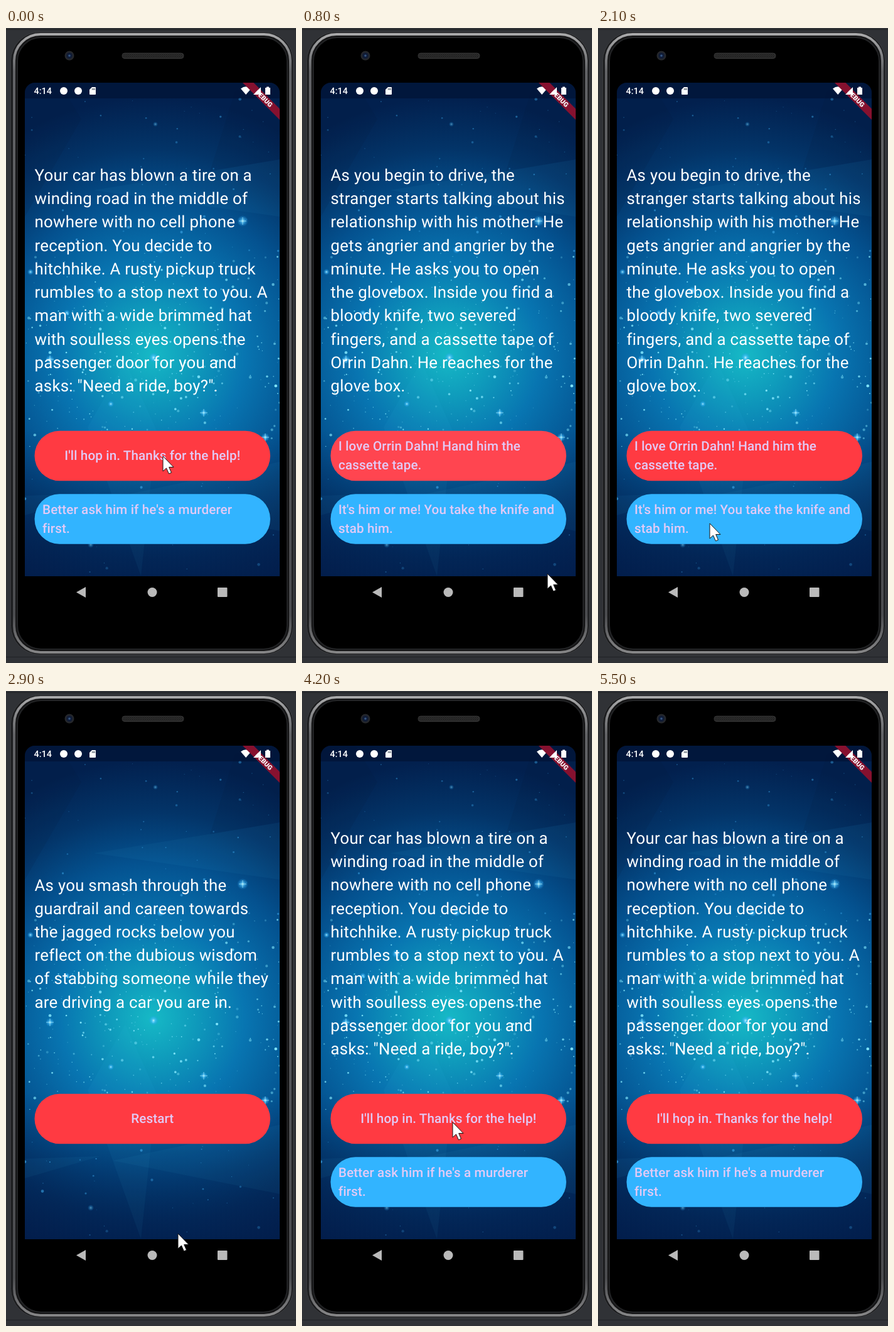
Animation, 462 px wide and 1010 px high, one loop 5.6 s. Source, as an HTML page:

```html
<!DOCTYPE html>
<html lang="en">
<head>
<meta charset="utf-8">
<title>Choose your story</title>
<style>
  html, body { margin: 0; height: 100%; overflow: hidden; background: #303236; }
  svg { display: block; width: 100vw; height: 100vh; }
  text { font-family: Roboto, sans-serif; white-space: pre; text-rendering: geometricPrecision; }
  .story { font-size: 25.85px; letter-spacing: .26px; fill: #fff; }
  .label { font-size: 20.68px; font-weight: 500; letter-spacing: .1px; fill: #e2caf6; }
</style>
</head>
<body>
<svg viewBox="0 0 462 1010">
  <defs>
    <radialGradient id="glow" gradientUnits="userSpaceOnUse" cx="233" cy="520" r="410">
      <stop offset="0" stop-color="#16b9c6"/>
      <stop offset=".16" stop-color="#0f9cbc"/>
      <stop offset=".36" stop-color="#0875b1"/>
      <stop offset=".6" stop-color="#045290"/>
      <stop offset=".8" stop-color="#033468"/>
      <stop offset="1" stop-color="#02204e"/>
    </radialGradient>
    <linearGradient id="shade" x2="0" y2="1">
      <stop offset="0" stop-color="#021c4a" stop-opacity="0"/>
      <stop offset=".5" stop-color="#021c4a" stop-opacity=".35"/>
      <stop offset="1" stop-color="#021c4a" stop-opacity=".7"/>
    </linearGradient>
    <radialGradient id="halo">
      <stop offset="0" stop-color="#d8fbff"/>
      <stop offset=".3" stop-color="#58c8ff" stop-opacity=".8"/>
      <stop offset="1" stop-color="#1998ee" stop-opacity="0"/>
    </radialGradient>
    <linearGradient id="metal" x2="0" y2="1">
      <stop offset="0" stop-color="#a9a9aa"/>
      <stop offset=".06" stop-color="#626366"/>
      <stop offset=".94" stop-color="#4b4c4f"/>
      <stop offset="1" stop-color="#858586"/>
    </linearGradient>
    <pattern id="mesh" width="3" height="3" patternUnits="userSpaceOnUse">
      <path d="M0 0h3v3h-3z" fill="#2d2d2d"/><path d="M0 0h1v1h-1zM1.5 1.5h1v1h-1z" fill="#111"/>
    </pattern>
    <clipPath id="screen"><path d="M30 872V103a16 16 0 0 1 16-16H420a16 16 0 0 1 16 16V872z"/></clipPath>
  </defs>

  <path d="M0 2.5H462M0 1000.5H462" stroke="#1f2124"/>

  <!-- phone body -->
  <rect x="7.500" y="6.500" width="450" height="990" rx="46" fill="#1c1d1f" stroke="#3b3c3f"/>
  <rect x="13" y="10" width="440" height="983" rx="42" fill="#151516" stroke="url(#metal)" stroke-width="4"/>
  <rect x="18" y="15" width="430" height="973" rx="38" fill="#000" stroke="#222325" stroke-width="2"/>
  <rect x="185" y="40" width="98" height="8.500" rx="4" fill="url(#mesh)" stroke="#363636"/>
  <circle cx="101" cy="44" r="7.500" fill="#25272b"/>
  <circle cx="101" cy="44" r="4.800" fill="#101c36"/>
  <circle cx="101" cy="44" r="1.800" fill="#365582"/>

  <!-- wallpaper -->
  <g clip-path="url(#screen)">
    <path d="M30 87H436V872H30z" fill="url(#glow)"/>
    <path d="M30 640H436V872H30z" fill="url(#shade)"/>
    <g fill="#38b8e8" fill-opacity=".05">
      <path d="M140 258L436 209V300zM170 747L436 690V800zM30 744L150 740 30 775z"/>
      <path d="M190 530L130 635 215 872 240 640z"/>
    </g>
    <path d="M30 87H85L120 145 30 300zM365 100L436 87V209L325 228z" fill="#001538" fill-opacity=".1"/>
    <g id="stars"></g>
    <path d="M30 87H436V112H30z" fill="#000b25" fill-opacity=".42"/>
  </g>

  <!-- status bar -->
  <g fill="#fff">
    <text x="44.5" y="105" font-size="14.4" font-weight="500">4:14</text>
    <circle cx="92" cy="100" r="6"/>
    <circle cx="115" cy="100" r="6"/>
    <path d="M137 94H142a1 1 0 0 1 1 1V105a1 1 0 0 1-1 1H134a1 1 0 0 1-1-1V98z"/>
    <path d="M137.5 96v2.5M139.5 96v2.5M141.2 96v2.5" stroke="#123" stroke-width=".9"/>
    <path d="M374 96.500Q382 90 390.500 96.500L382.200 106z"/>
  </g>
  <g clip-path="url(#screen)">
    <path d="M377 87H394.500L436 128.500V146z" fill="#86112f"/>
    <path d="M394 106L406 94V106zM413 95H415V93.500H419V95H421V106H413z" fill="#fff"/>
    <text transform="translate(411 112) rotate(45)" y="3.7" font-size="10.5" font-weight="900" text-anchor="middle" fill="#fff">DEBUG</text>
  </g>

  <g id="scenes"></g>

  <g fill="#bababa">
    <path d="M112 897.500L127 889V906z"/>
    <circle cx="233" cy="897.500" r="7.500"/>
    <rect x="337" y="890" width="15.500" height="15" rx="1"/>
  </g>
  <path id="cursor" d="M0 0V24L5.500 19 9.500 28 13.500 26.200 9.700 17.500H17z" fill="#fff" stroke="#151515"/>
</svg>
<script>
const LOOP = 5600, STEP = 100;
const RED = '#ff3a42', RED_PRESSED = '#ff4550', BLUE = '#32b4ff';
const $ = id => document.getElementById(id);

function add(parent, tag, attrs, content = '') {
  const node = document.createElementNS('http://www.w3.org/2000/svg', tag);
  for (const name in attrs) node.setAttribute(name, attrs[name]);
  node.textContent = content;
  return parent.appendChild(node);
}

function drawStars() {
  let seed = 41;
  const random = () => (seed = seed * 16807 % 2147483647) / 2147483647;
  const stars = $('stars');
  for (let i = 0; i < 420; i++) {
    const cx = 30 + 406 * random();
    const spread = (random() + random() + random()) / 3;
    const cy = i % 3 ? 250 + 560 * spread : 112 + 755 * random();
    const near = Math.max(0, 1 - Math.abs(cy - 530) / 350);
    add(stars, 'circle', {
      cx, cy, r: .6 + 1.8 * random() ** 3,
      fill: near > .5 ? '#7fe4fa' : '#3aa4e6',
      opacity: .25 + .6 * random() * (.4 + near)
    });
  }
  const bright = [[377, 307, 9], [70, 527, 7], [315, 612, 6], [413, 651, 7], [235, 524, 8],
    [150, 418, 7], [246, 353, 6], [39, 388, 5], [167, 598, 5], [135, 822, 5], [97, 453, 5], [238, 153, 4]];
  for (const [cx, cy, r] of bright) add(stars, 'circle', {cx, cy, r, fill: 'url(#halo)', opacity: cy < 200 || cy > 800 ? .5 : .9});
  for (const [x, y] of bright.slice(0, 4)) {
    add(stars, 'path', {d: `M${x - 6} ${y}h12M${x} ${y - 6}v12`, stroke: '#a9efff', 'stroke-width': .7});
  }
}

function drawButton(parent, top, fill, lines) {
  const box = add(parent, 'rect', {x: 45.5, y: top, width: 375.5, height: 79.5, rx: 39.7, fill});
  lines.forEach((line, i) => {
    const centred = lines.length === 1;
    add(parent, 'text', {
      class: 'label', x: centred ? 233.3 : 58, y: top + (centred ? 46.5 : 31.5 + 30 * i),
      'text-anchor': centred ? 'middle' : 'start'
    }, line);
  });
  return box;
}

function drawScene(baseline, story, redLabel, blueLabel) {
  const group = add($('scenes'), 'g', {});
  story.split('\n').forEach((line, i) => add(group, 'text', {class: 'story', x: 45.5, y: baseline + 37.23 * i}, line));
  const red = drawButton(group, 640.7, RED, redLabel.split('\n'));
  if (blueLabel) drawButton(group, 741.2, BLUE, blueLabel.split('\n'));
  return {group, red};
}

drawStars();
const scenes = [
  drawScene(243, `Your car has blown a tire on a
winding road in the middle of
nowhere with no cell phone
reception. You decide to
hitchhike. A rusty pickup truck
rumbles to a stop next to you. A
man with a wide brimmed hat
with soulless eyes opens the
passenger door for you and
asks: "Need a ride, boy?".`,
    "I'll hop in. Thanks for the help!", "Better ask him if he's a murderer\nfirst."),
  drawScene(243, `As you begin to drive, the
stranger starts talking about his
relationship with his mother. He
gets angrier and angrier by the
minute. He asks you to open
the glovebox. Inside you find a
bloody knife, two severed
fingers, and a cassette tape of
Orrin Dahn. He reaches for the
glove box.`,
    'I love Orrin Dahn! Hand him the\ncassette tape.', "It's him or me! You take the knife and\nstab him."),
  drawScene(317.5, `As you smash through the
guardrail and careen towards
the jagged rocks below you
reflect on the dubious wisdom
of stabbing someone while they
are driving a car you are in.`, 'Restart')
];

// Pointer stops: time, x, y
const stops = [[0, 250, 681], [300, 250, 681], [800, 391, 868], [1100, 391, 868], [1900, 178, 788],
  [2400, 178, 788], [2900, 274, 863], [3100, 274, 863], [3700, 240, 686], [4200, 240, 686], [4600, 300, 870]];

function pointerAt(time) {
  const next = stops.findIndex(stop => stop[0] > time);
  if (next < 0) return null;
  const [t0, x0, y0] = stops[next - 1], [t1, x1, y1] = stops[next];
  const p = (time - t0) / (t1 - t0), ease = p * p * (3 - 2 * p);
  return [x0 + (x1 - x0) * ease, y0 + (y1 - y0) * ease];
}

function render(now) {
  const time = Math.floor(now % LOOP / STEP) * STEP;
  const current = time < 400 || time >= 4200 ? 0 : time < 2500 ? 1 : 2;
  scenes.forEach(({group}, i) => group.style.display = i === current ? '' : 'none');
  scenes[1].red.setAttribute('fill', time < 900 ? RED_PRESSED : RED);
  const pointer = pointerAt(time);
  $('cursor').style.display = pointer ? '' : 'none';
  if (pointer) $('cursor').setAttribute('transform', `translate(${pointer})`);
}

const start = performance.now();
function tick() {
  render(performance.now() - start);
  requestAnimationFrame(tick);
}
tick();
</script>
</body>
</html>
```
